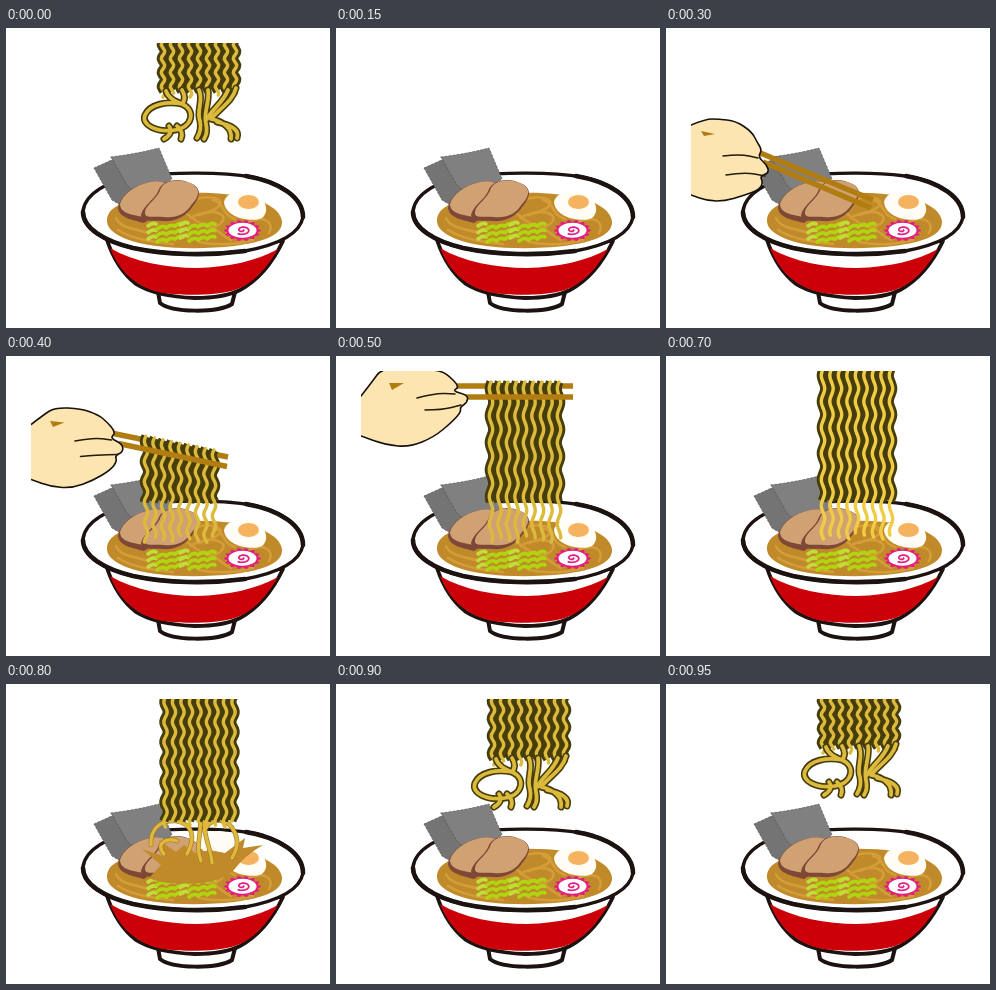
Animation of 324 by 300 pixels, one loop 1 s. Source, as an HTML page:

```html
<!DOCTYPE html>
<html lang="en">
<head>
<meta charset="utf-8">
<title>Ramen</title>
<style>
  html, body { margin: 0; width: 100%; height: 100%; overflow: hidden; background: #fff; }
  svg { display: block; width: 324px; height: 300px; }
  path, ellipse { stroke-linecap: round; stroke-linejoin: round; }
  .line { fill: none; }
</style>
</head>
<body>
<svg viewBox="0 0 324 300">
  <defs><clipPath id="view"><rect x="25" y="15" width="275" height="270"/></clipPath></defs>
  <g clip-path="url(#view)">
    <!-- bowl -->
    <g stroke="#1c1210">
      <path d="M152 264L154 275C166 285 212 285 226 276L229 264Z" fill="#fff" stroke-width="4"/>
      <path d="M101 212C107 230 117 246 130 256C144 265 164 269 189 270C209 270 222 268 234 262C251 253 265 238 277 213Z" fill="#fff" stroke-width="3.8"/>
      <path d="M104 220C128 234 160 240 191 240C223 239 250 233 272 221C261 240 247 256 229 262C208 268 172 268 152 264C127 257 113 242 104 220Z" fill="#cc0009" stroke="none"/>
      <path d="M77 183C79 166 102 152 132 148C168 144 216 144 246 149C277 155 297 171 297 189C294 206 271 217 239 223C202 228 160 227 127 220C97 213 76 200 77 183Z" fill="#fff" stroke-width="3.4"/>
      <path class="line" d="M240 148C275 154 297 170 297 189M77 184C77 200 98 213 127 220C160 227 202 228 239 223" stroke-width="4.6"/>
    </g>
    <path d="M101 191C103 174 136 166 180 165C224 163 273 171 276 193C277 207 258 214 228 218C193 222 145 221 120 211C108 206 100 200 101 191Z" fill="#c08a2a"/>
    <g class="line" stroke="#d49d38" stroke-width="2.6">
      <path d="M187 172C203 166 221 171 212 179S190 184 185 190"/>
      <path d="M193 187C208 180 225 187 214 196S192 194 181 186"/>
      <path d="M207 172C219 175 215 187 229 191M243 194C258 187 269 194 263 205"/>
      <path d="M110 190C115 201 131 201 143 205M112 202C128 212 149 214 167 216"/>
      <path d="M193 214C213 218 232 216 247 212M205 199C213 202 215 208 225 212"/>
    </g>
    <!-- toppings -->
    <g stroke="#555" stroke-width=".7" stroke-dasharray="2 2">
      <path d="M88 140L110 130L140 165L116 178L106 172Z" fill="#747474"/>
      <path d="M105 129Q130 126 153 120L166 151L136 170L121 157Z" fill="#808080"/>
    </g>
    <g fill="#d0a173">
      <path d="M112 180C114 168 127 157 144 154C158 151 166 157 164 166C159 177 148 189 138 195C127 192 113 190 112 180Z" fill="#7d4936"/>
      <path d="M114 176C117 166 129 157 144 154C157 151 166 157 163 164C157 173 146 185 138 189C128 187 114 186 114 176Z"/>
      <path d="M135 187C137 177 150 171 153 161C158 151 174 150 184 155C197 160 194 170 187 178C180 189 169 194 156 193C146 192 136 195 135 187Z" fill="#7d4936"/>
      <path d="M139 184C140 176 152 171 155 160C160 151 175 151 184 155C196 160 193 169 186 176C179 187 170 190 158 189C148 188 138 191 139 184Z"/>
    </g>
    <path d="M218 174C220 164 236 161 248 166C260 171 264 183 256 190C246 195 219 190 218 174Z" fill="#fffdf5"/>
    <ellipse cx="242.5" cy="174" rx="10.5" ry="7" fill="#f6b35f"/>
    <g id="leeks"></g>
    <g id="cake"></g>
    <g id="scene"></g>
  </g>
</svg>
<script>
const NS = 'http://www.w3.org/2000/svg';
const $ = id => document.getElementById(id);
const scene = $('scene');
const DARK = '#463d0b', GOLD = '#dcba3b', BRIGHT = '#ffda4d', WOOD = '#b27d10';

function add(parent, tag, attrs) {
  const el = document.createElementNS(NS, tag);
  for (const key in attrs) el.setAttribute(key, attrs[key]);
  parent.appendChild(el);
  return el;
}
const line = (g, d, stroke, width) =>
  add(g, 'path', { d, stroke, 'stroke-width': width, fill: 'none' });
const fill = (g, d, color) => add(g, 'path', { d, fill: color });
const mix = (a, b, k) => a.map((v, i) => v + (b[i] - v) * k);

function wave(x, top, end, len, amp) {
  let d = '';
  for (let y = top; y <= end; y += 2) {
    const px = x - amp * Math.sin((y - top) / len * 2 * Math.PI);
    d += `${d ? 'L' : 'M'}${px.toFixed(1)} ${y.toFixed(1)}`;
  }
  return d;
}

// Nine hanging strands; the dark backing stops above the loose ends.
function bundle(g, { x, top, back, end, len, color = GOLD, gap = 8.5, amp = 1.7, slope = 0 }) {
  const each = fn => {
    for (let i = 0; i < 9; i++) fn(x + i * gap, top + i * gap * slope, i);
  };
  each((px, y) => add(g, 'path', {
    d: wave(px, y, back, len, amp), stroke: DARK, 'stroke-width': 9.2,
    fill: 'none', style: 'stroke-linecap:butt'
  }));
  each((px, y, i) => line(g, wave(px, y, end - (i * 5) % 7, len, amp), color, 3.4));
}

// Outline points of the hand, low and raised.
const LOW = [25,97, 40,91, 52,91, 70,93, 86,104, 91,114, 96,122, 92,129, 101,137, 103,145, 94,148, 97,155, 93,162, 76,168, 59,173, 42,173, 25,167];
const HIGH = [25,40, 36,26, 46,12, 80,12, 99,14, 110,17, 124,31, 116,35, 132,39, 131,47, 124,51, 125,56, 116,66, 98,81, 74,91, 50,89, 25,80];
const STICKS = [
  [[92,124, 207,172], [118,30, 237,30]],
  [[97,134, 205,180], [128,41, 237,41]]
];
const CREASES = [
  [[57,128, 74,126, 92,130], [81,42, 99,37, 119,38]],
  [[60,147, 78,144, 99,148], [89,54, 106,54, 125,49]]
];
const MARK = [[35,103, 49,106, 38,108], [53,27, 68,27, 56,34]];

function smooth(p) {
  let d = `M${p[0]} ${p[1]}`;
  for (let i = 2; i < p.length - 2; i += 2)
    d += `Q${p[i]} ${p[i + 1]} ${(p[i] + p[i + 2]) / 2} ${(p[i + 1] + p[i + 3]) / 2}`;
  return d + `L${p.slice(-2).join(' ')}`;
}
function stick(g, [x1, y1, x2, y2]) {
  add(g, 'path', {
    d: `M${x1} ${y1}L${x2} ${y2}`, stroke: WOOD, 'stroke-width': 5.5,
    style: 'stroke-linecap:butt'
  });
}
function hand(g, k) {
  const d = smooth(mix(LOW, HIGH, k));
  fill(g, d + 'Z', '#fde5b2');
  line(g, d, '#17110a', 1.6);
  CREASES.forEach(c => line(g, smooth(mix(...c, k)), '#241a08', 1.5));
  fill(g, 'M' + mix(...MARK, k).join(' ') + 'Z', WOOD);
}
function lift(g, k) {
  const [upper, lower] = STICKS.map(s => mix(...s, k));
  stick(g, upper);
  if (k) {
    const [x1, y1, x2, y2] = upper;
    const slope = (y2 - y1) / (x2 - x1), x = x2 - 82;
    bundle(g, {
      x, top: y1 + (x - x1) * slope - 4, slope,
      back: 147, end: 187, len: 27 * (0.5 + k / 2)
    });
  }
  stick(g, lower);
  hand(g, k);
}

function splash(g) {
  fill(g, 'M194 163C195 148 213 143 224 150C233 156 229 166 222 170L202 172Z', '#fffdf5');
  fill(g, 'M143 194L155 181L136 165L160 173L153 156L170 168L178 161L189 169L204 166L219 169L239 154L237 164L257 161Q239 171 227 187Q205 203 174 199Q154 200 143 194Z', '#c08a2a');
  const arcs = ['M145 161C144 145 154 136 170 137C187 140 190 153 181 170',
    'M158 170C149 160 160 153 171 157',
    'M193 130C198 148 188 160 195 177M199 130C196 152 205 163 206 179',
    'M198 147C205 132 222 133 229 149C233 158 231 165 226 174'];
  arcs.forEach(d => line(g, d, '#9c7a20', 4.6));
  arcs.forEach(d => line(g, d, '#dfb83c', 3.4));
}

// The noodles spell a word; dy stretches the strands it hangs from.
function word(g, dy) {
  bundle(g, { x: 157, top: 13, back: 63 + dy, end: 70 + dy, len: 14 * (1 + dy / 50), gap: 9 });
  const w = add(g, 'g', { transform: `translate(0 ${dy})` });
  const strokes = [
    'M160 63C162 70 169 73 176 76M176 62Q181 70 176 76C190 82 187 99 169 102C151 105 135 97 139 87C144 76 161 73 176 76',
    'M163 98Q168 105 158 111M171 98Q178 104 175 111',
    'M193 62C198 72 190 83 194 93Q196 102 191 110M202 62C204 74 197 85 200 96Q202 105 198 111',
    'M230 60C227 73 214 80 205 91C216 93 227 100 225 111M222 62C217 75 207 80 201 91M211 94Q235 99 231 110'
  ];
  strokes.forEach(d => line(w, d, DARK, 7));
  strokes.forEach(d => line(w, d, GOLD, 3.8));
}

// Leeks and fish cake
for (let i = 0; i < 24; i++) {
  const x = 142 + (i % 8) * 8 + (i * 5) % 4;
  const y = 211 - Math.floor(i / 8) * 6.5 - (i % 8 > 2 ? 1 : 0) + (i * 3) % 4;
  line($('leeks'), `M${x} ${y}q5 -4 8 -2`, i % 4 ? '#b0d40f' : '#c2dc3a', 3.6);
}
let rim = '', curl = '';
for (let i = 0; i <= 96; i++) {
  const a = i / 96 * 2 * Math.PI, r = 1 + 0.1 * Math.cos(a * 14);
  rim += `${i ? 'L' : 'M'}${(236.5 + 17 * r * Math.cos(a)).toFixed(1)} ${(202.5 + 9.7 * r * Math.sin(a)).toFixed(1)}`;
}
for (let i = 0; i <= 40; i++) {
  const a = i / 40 * 8.4, r = 1 + i / 40 * 7;
  curl += `${i ? 'L' : 'M'}${(236.5 + r * Math.cos(a)).toFixed(1)} ${(202 + r * 0.57 * Math.sin(a)).toFixed(1)}`;
}
fill($('cake'), rim + 'Z', '#e51b80');
add($('cake'), 'ellipse', { cx: 236.5, cy: 202.3, rx: 14, ry: 7.5, fill: '#fff' });
line($('cake'), curl, '#e51b80', 1.7);

// Start time in ms and what is shown from then on
const steps = [
  [0, g => word(g, 0)],
  [50, g => word(g, 8)],
  [150, () => {}],
  [300, g => lift(g, 0)],
  [400, g => lift(g, 0.5)],
  [500, g => lift(g, 1)],
  [600, g => bundle(g, { x: 155, top: 13, back: 146, end: 191, len: 33, color: BRIGHT })],
  [700, g => bundle(g, { x: 157, top: 13, back: 146, end: 184, len: 26, color: '#f0cc45' })],
  [800, g => {
    splash(g);
    bundle(g, { x: 159.5, top: 13, back: 137, end: 143, len: 20 });
  }],
  [900, g => word(g, 12)],
  [950, g => word(g, 0)]
].map(([at, draw]) => {
  const g = add(scene, 'g', { visibility: 'hidden' });
  draw(g);
  return { at, g };
});

let shown;
const start = performance.now();
function show(now) {
  const t = Math.max(0, now - start) % 1000;
  const step = steps.filter(s => s.at <= t).pop();
  if (step !== shown) {
    if (shown) shown.g.setAttribute('visibility', 'hidden');
    step.g.setAttribute('visibility', 'visible');
    shown = step;
  }
  requestAnimationFrame(show);
}
show(start);
</script>
</body>
</html>
```
